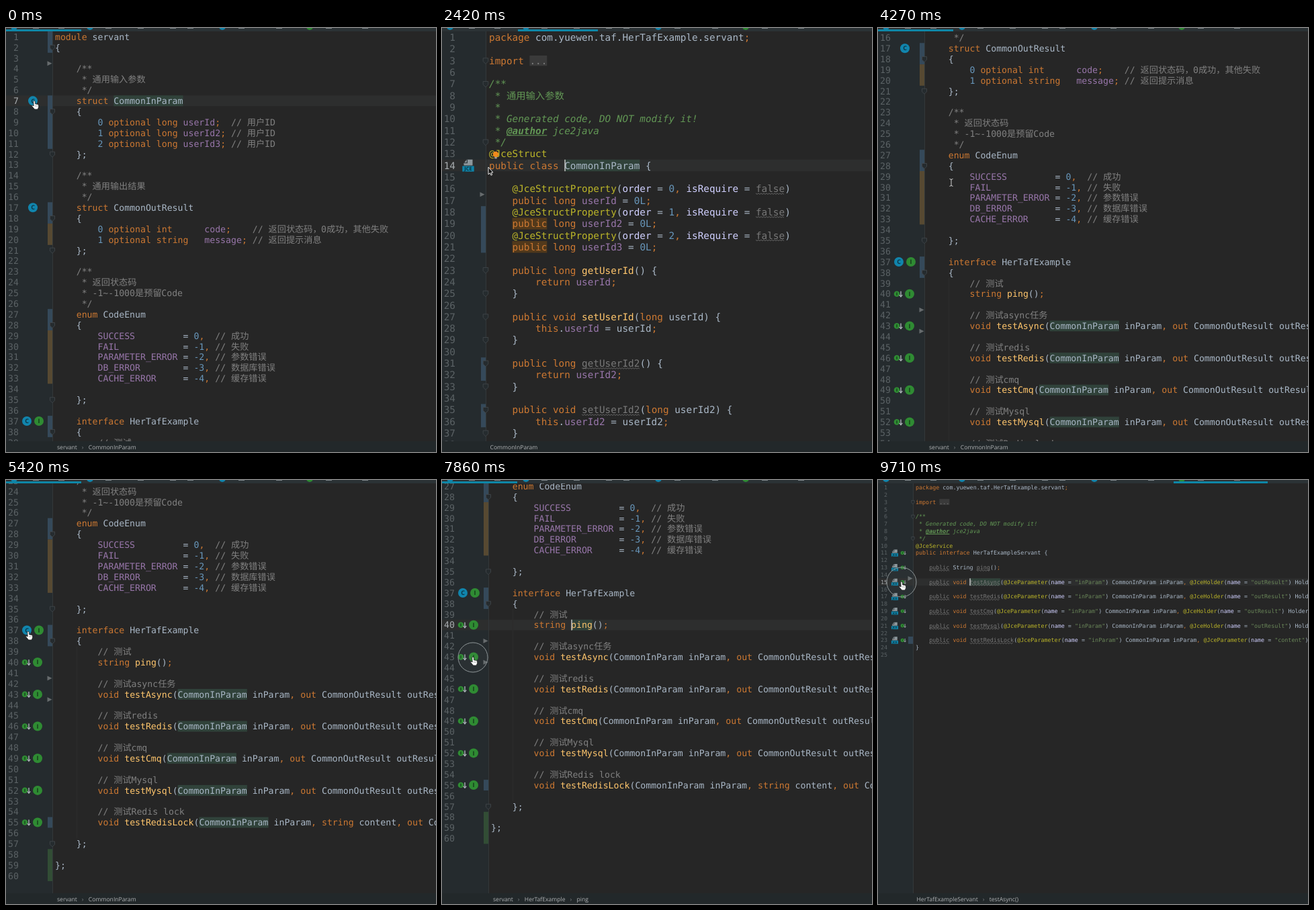
These frames come from a looping animation (640 by 631 pixels, 9860 ms). An HTML page with a canvas:

```html
<!DOCTYPE html>
<html lang="zh">
<head>
<meta charset="utf-8">
<title>Code navigation</title>
<style>
html, body { margin: 0; width: 100%; height: 100%; overflow: hidden; background: #262626; }
canvas { display: block; }
</style>
</head>
<body>
<canvas id="stage" width="640" height="631"></canvas>
<script>
const LOOP = 9860, W = 640, H = 631, BAR = 615;
const ctx = document.getElementById('stage').getContext('2d');
const MONO = '"DejaVu Sans Mono", "Noto Sans CJK SC", "Noto Sans CJK", monospace';
const SANS = '"Open Sans", "Noto Sans", sans-serif';
const C = {
  bg: '#262626', gutter: '#252b2e', row: '#2d2e2e', text: '#a9b7c6', key: '#cc7832',
  num: '#6897bb', field: '#9876aa', fn: '#ffc66d', ann: '#bbb529', str: '#6a8759',
  doc: '#629755', note: '#808080', dim: '#787878', attr: '#d0d0ff', mark: '#30423a',
  warn: '#52391b', line: '#5b6265', lineOn: '#a9adb0', blue: '#35495a',
  brown: '#574932', green: '#324d35', teal: '#1185ad', leaf: '#2f8b33'
};
const KEYS = new Set(('module struct optional long int string enum interface void out package import ' +
  'public class return this private implements new').split(' '));
const TOKEN = /([~!%$&])(\w+)\1|\/\/.*|".*?"|@\w+|\.\.\.|[A-Za-z_]\w*|-?\d+L?|[;,]|\s+|[^\w\s]/g;
const STYLE = { '~': C.dim, '!': C.key, '%': C.field, '$': C.fn, '&': C.attr };

// Markup: ~unused~  !warned keyword!  %field%  $method$  &attribute&
const call = (name, note) => `        // 测试${note}
        void $${name}$(CommonInParam inParam, out CommonOutResult outResult);
`;
const jceText = `module servant
{

    /**
     * 通用输入参数
     */
    struct CommonInParam
    {
        0 optional long %userId%;  // 用户ID
        1 optional long %userId2%; // 用户ID
        2 optional long %userId3%; // 用户ID
    };

    /**
     * 通用输出结果
     */
    struct CommonOutResult
    {
        0 optional int      %code%;    // 返回状态码，0成功，其他失败
        1 optional string   %message%; // 返回提示消息
    };

    /**
     * 返回状态码
     * -1~-1000是预留Code
     */
    enum CodeEnum
    {
        %SUCCESS%         = 0,  // 成功
        %FAIL%            = -1, // 失败
        %PARAMETER_ERROR% = -2, // 参数错误
        %DB_ERROR%        = -3, // 数据库错误
        %CACHE_ERROR%     = -4, // 缓存错误

    };

    interface HerTafExample
    {
        // 测试
        string $ping$();

${call('testAsync', 'async任务')}
${call('testRedis', 'redis')}
${call('testCmq', 'cmq')}
${call('testMysql', 'Mysql')}
        // 测试Redis lock
        void $testRedisLock$(CommonInParam inParam, string content, out CommonOutResult outResult);

    };

};
`;

const prop = (i, pub) => `    @JceStructProperty(&order& = ${i}, &isRequire& = ~false~)
    ${pub} long %userId${i ? i + 1 : ''}% = 0L;
`;
const access = (id, q) => `
    public long ${q}getU${id}${q}() {
        return %u${id}%;
    }

    public void ${q}setU${id}${q}(long u${id}) {
        this.%u${id}% = u${id};
    }
`;
const structText = `package com.yuewen.taf.HerTafExample.servant;

import ...



/**
 * 通用输入参数
 *
 * Generated code, DO NOT modify it!
 * @author jce2java
 */
@JceStruct
public class CommonInParam {

` + prop(0, 'public') + prop(1, '!public!') + prop(2, '!public!') +
  access('serId', '$') + access('serId2', '~');

const over = (name, body) => `
    @Override
    public void $${name}$(CommonInParam inParam, Holder<CommonOutResult> outResult) {
${body}
    }
`;
const implText = '\n'.repeat(12) + `@TafService("obj")
public class ~HerTafExampleImpl~ implements HerTafExampleServant {
    @Autowired
    private ICosService ~iCosService~;

    @Autowired
    private ExampleAsync ~exampleAsync~;

    public ~HerTafExampleImpl~() {
    }

    public String $ping$() {
        return "success";
    }
` + over('testAsync', `        %exampleAsync%.task();

        CommonOutResult outResultValue = new CommonOutResult(Code.%SUCCESS%.getValue());
        outResult.setValue(outResultValue);`) +
  over('testRedis', '') + over('testCmq', '') + over('testMysql', '');

const param = n => `@JceParameter(&name& = "${n}")`;
const remote = (name, mid = '') => `
    ~public~ void ~${name}~(${param('inParam')} CommonInParam inParam, ${mid}@JceHolder(&name& = "outResult") Holder<CommonOutResult> outResult);
`;
const servantText = `package com.yuewen.taf.HerTafExample.servant;

import ...


/**
 * Generated code, DO NOT modify it!
 * @author jce2java
 */
@JceService
public interface HerTafExampleServant {

    ~public~ String ~ping~();
` + ['testAsync', 'testRedis', 'testCmq', 'testMysql'].map(n => remote(n)).join('') +
  remote('testRedisLock', param('content') + ' String content, ') + '}\n';

const each = (lines, ...icons) => lines.flatMap(n => icons.map(([kind, x]) => [n, kind, x]));
const jce = {
  text: jceText, x: 73, y: 13, pitch: 15.89, cw: 7.94, gut: 69, right: 19, tab: [0, 112],
  icons: [[7, 'c', 40], [17, 'c', 40], [37, 'c', 31], [37, 'i', 49],
    ...each([40, 43, 46, 49, 52, 55], ['down', 29], ['i', 47])],
  vcs: [[1, 2, C.blue], [7, 11, C.blue], [17, 18, C.blue], [19, 20, C.brown], [27, 28, C.blue],
    [29, 33, C.brown], [37, 38, C.blue], [55, 55, C.blue], [58, 60, C.green]],
  folds: [2, 8, 12, 18, 21, 28, 35, 38, 57], tris: [3.5, 41.5, 43.5], triX: 65
};
const top7 = { ...jce, cur: 7, mark: 'CommonInParam', crumbs: ['servant', 'CommonInParam'] };
const onPing = { ...jce, cur: 40, mark: 'ping', caret: 193, crumbs: ['servant', 'HerTafExample', 'ping'] };
const struct = {
  text: structText, java: true, x: 70, y: 14, pitch: 17.32, cw: 8.63, gut: 65, right: 20, skip: 2,
  tab: [113, 232], cur: 14, mark: 'CommonInParam', caret: 183, bulb: [80, 188, '#f08a1c'],
  icons: [[14, 'jce', 39]], vcs: [[18, 21, C.blue], [31, 32, C.blue], [35, 36, C.blue]],
  folds: [3, 7, 12, 23, 25, 27, 29, 31, 33, 35, 37], tris: [16.5], triX: 60, crumbs: ['CommonInParam']
};
const impl = {
  text: implText, java: true, x: 89, y: -165.8, pitch: 16.6, cw: 7.94, gut: 83, right: 19,
  tab: [312, 438], cur: 24, mark: 'ping', caret: 232, bulb: [99, 213, '#f0b32c'],
  icons: [[14, 'jce', 48], [21, 'at', 65], [29, 'jce', 48], [29, 'at', 65],
    ...each([24, 29, 37, 42, 47], ['up', 30]), ...each([24, 37, 42, 47], ['jce', 56])],
  vcs: [[25, 25, C.blue]], folds: [21, 22, 24, 26, 29, 34, 37, 39, 42, 44, 47],
  tris: [12.5, 14.5, 21.5, 27.5, 29.5, 33.5, 35.5], triX: 79, crumbs: ['HerTafExampleImpl', 'ping()']
};
const servant = {
  text: servantText, java: true, x: 56, y: 11, pitch: 10.83, cw: 5.04, gut: 52, right: 14, skip: 1,
  tab: [440, 580], cur: 15, mark: 'testAsync', caret: 137,
  icons: each([11, 13, 15, 17, 19, 21, 23], ['jce', 25], ['down', 37]), vcs: [[23, 23, C.blue]],
  folds: [3, 6, 9], tris: [14.5], triX: 48, crumbs: ['HerTafExampleServant', 'testAsync()']
};
const CUTS = [[0, top7], [850, struct], [3000, top7], [5700, impl], [6950, onPing], [8090, servant]];
const SCROLL = [[3450, 0], [4270, 237], [4900, 361.5], [5700, 361.5], [6900, 417]];
const POINTER = [
  [0, 42, 109, 'hand'], [850, 42, 109, 'arrow'], [1500, 60, 170, 'arrow'], [2100, 74, 214, 'arrow'],
  [2420, 69, 207, 'arrow'], [2720, 39, 205, 'hand'], [3000, 39, 205, 'arrow'], [3300, 109, 230, 'beam'],
  [4600, 109, 230, 'arrow'], [5150, 33, 226, 'hand'], [5750, 33, 226, 'arrow'], [6400, 57, 220, 'hand'],
  [7050, 57, 220, 'arrow'], [7600, 46, 264, 'hand'], [8150, 46, 264, 'arrow'], [9100, 35, 152, 'hand']
];
const CLICKS = [620, 2790, 5570, 6800, 7780, 9620];

const last = (keys, t) => keys.filter(k => k[0] <= t).pop() || keys[0];
const ease = p => p * p * (3 - 2 * p);
function track(keys, t, i) {
  const a = last(keys, t), b = keys[keys.indexOf(a) + 1];
  if (!b || t <= a[0]) return a[i];
  return a[i] + (b[i] - a[i]) * ease((t - a[0]) / (b[0] - a[0]));
}
function box(x, y, w, h, color) { ctx.fillStyle = color; ctx.fillRect(x, y, w, h); }
function disc(x, y, r, color) {
  ctx.fillStyle = color;
  ctx.beginPath(); ctx.arc(x, y, r, 0, 7); ctx.fill();
}
function path(points, fill, stroke, width = 1) {
  ctx.beginPath();
  points.forEach(([x, y], i) => i ? ctx.lineTo(x, y) : ctx.moveTo(x, y));
  if (fill) { ctx.closePath(); ctx.fillStyle = fill; ctx.fill(); }
  if (stroke) { ctx.strokeStyle = stroke; ctx.lineWidth = width; ctx.stroke(); }
}
function label(str, x, y, font, color, align = 'left') {
  ctx.font = font; ctx.fillStyle = color; ctx.textAlign = align;
  ctx.fillText(str, x, y);
}

// Draws one run on the character grid and returns the x after it.
function put(s, str, x, y, color, look = '') {
  const em = s.cw / 0.602;
  for (const run of str.match(/[\u2e80-\uffef]+|[^\u2e80-\uffef]+/g) || []) {
    const wide = run.charCodeAt(0) >= 0x2e80;
    label(run, x, y + em * 0.36, `${wide ? '' : look} ${em}px ${MONO}`, color);
    x += run.length * (wide ? em * 0.99 : s.cw);
  }
  return x;
}
function wave(x, end, y) {
  const pts = [];
  for (let i = 0; x + i * 2 <= end; i++) pts.push([x + i * 2, y + (i % 2 ? 1 : -0.5)]);
  path(pts, null, '#747474', 0.8);
}
function docLine(s, str, y) {
  let x = s.x;
  for (const part of str.split(/(@\w+)/)) {
    const tag = part[0] === '@', from = x;
    x = put(s, part, x, y, s.java ? C.doc : C.note, s.java ? (tag ? 'italic bold' : 'italic') : '');
    if (tag) box(from, y + s.cw * 0.78, x - from, 1, C.doc);
  }
}
function codeLine(s, str, y) {
  if (/^\s*(\/\*|\*)/.test(str)) return docLine(s, str, y);
  const closing = /^\s*};$/.test(str), h = s.pitch;
  let x = s.x;
  for (const m of str.matchAll(TOKEN)) {
    const kind = m[1], word = m[2] || m[0], end = x + word.length * s.cw;
    let color = C.text;
    if (kind) color = STYLE[kind];
    else if (word.startsWith('//')) color = C.note;
    else if (word[0] === '"') color = C.str;
    else if (word[0] === '@') color = C.ann;
    else if (KEYS.has(word) || (/[;,]/.test(word) && !closing)) color = C.key;
    else if (/^-?\d/.test(word)) color = C.num;
    if (word === s.mark) box(x, y - h / 2, end - x, h, C.mark);
    if (kind === '!') box(x, y - h / 2, end - x, h, C.warn);
    if (word === '...') { box(x, y - h / 2 + 1, end - x, h - 2, '#3a3a3a'); color = C.note; }
    const italic = s.java && word === 'SUCCESS' ? 'italic' : '';
    x = put(s, word, x, y, color, italic);
    if (kind === '~') wave(end - word.length * s.cw, end, y + s.cw * 0.85);
  }
}

const letter = (ch, px, color, y = 0) => label(ch, 0, y + px * 0.36, `bold ${px}px ${SANS}`, color, 'center');
function arrow(x, dir, color) {
  path([[x, -4 * dir], [x, 4 * dir]], null, color, 1.3);
  path([[x - 2.3, 1.5 * dir], [x, 4.3 * dir], [x + 2.3, 1.5 * dir]], null, color, 1.2);
}
const ICON = {
  c() { disc(0, 0, 7, C.teal); letter('C', 9, '#0d3444'); },
  i() { disc(0, 0, 7, C.leaf); letter('I', 9, '#14381a'); },
  down() { disc(-1, 0, 4.3, C.leaf); box(-1.6, -2.2, 1.2, 4.4, '#14381a'); arrow(5, 1, '#b4bcc0'); },
  up() { disc(-1, 0, 4.3, C.leaf); box(-1.6, -2.2, 1.2, 4.4, '#14381a'); arrow(5, -1, '#d4504a'); },
  at() { letter('@', 12, '#aab0b3'); },
  jce() {
    path([[-6, -3], [-2, -8], [6, -8], [6, 0], [-6, 0]], '#8d979c');
    path([[-6, -3.5], [-1.5, -3.5], [-1.5, -8]], null, C.gutter, 1);
    box(-8, 0.8, 16, 7.6, '#0f83a8');
    letter('JCE', 7, '#0c3442', 4.7);
  }
};

function editor(s, shift) {
  const k = s.cw / 7.94, h = s.pitch;
  const rowY = n => s.y - shift + (n - 1 - (s.skip && n > 3 ? s.skip : 0)) * h;
  box(0, 0, s.gut, H, C.gutter);
  box(0, rowY(s.cur) - h / 2, W, h, C.row);
  for (const [a, b, color] of s.vcs) box(s.gut - 7, rowY(a) - h / 2, 7, rowY(b) - rowY(a) + h, color);
  box(s.gut, 5, 1, BAR - 5, '#33383a');
  if (!s.java) box(s.x + 4 * s.cw, rowY(39) - h / 2, 1, 18 * h, '#2d2d2d');
  for (const n of s.folds) {
    const y = rowY(n), r = 3.5 * k;
    path([[s.gut - r, y - r], [s.gut + r, y - r], [s.gut + r, y + 1], [s.gut, y + r + 1], [s.gut - r, y + 1], [s.gut - r, y - r]],
      C.gutter, '#444a4d', 0.8);
  }
  s.text.split('\n').forEach((str, i) => {
    const n = i + 1, y = rowY(n);
    if (y < -h || y > BAR + h || (s.skip && n > 3 && n <= 3 + s.skip)) return;
    put(s, String(n), s.right - String(n).length * s.cw, y, n === s.cur ? C.lineOn : C.line);
    codeLine(s, str, y);
  });
  for (const n of s.tris) {
    const y = rowY(n);
    path([[s.triX - 3.5, y - 3.5], [s.triX + 3.5, y], [s.triX - 3.5, y + 3.5]], '#666b6d');
  }
  for (const [n, kind, x] of s.icons) {
    ctx.save();
    ctx.translate(x, rowY(n)); ctx.scale(k, k);
    ICON[kind]();
    ctx.restore();
  }
  if (s.caret) box(s.caret - 0.7, rowY(s.cur) - h / 2, 1.5, h, '#c4c4c4');
  if (s.bulb) {
    const [x, y, color] = s.bulb;
    disc(x, y, 4.2, color);
    box(x - 1.8, y + 4, 3.6, 2.5, '#9a9a9a');
  }
}

function chrome(s) {
  box(0, 0, W, 5, '#2b3235');
  for (const x of [12, 125, 322]) disc(x, -2, 5, C.teal);
  disc(452, -2, 5, C.leaf);
  for (const x of [40, 78, 148, 196, 244, 270, 346, 402, 476, 530]) box(x, 0, 9, 1, '#7d8589');
  box(s.tab[0], 2, s.tab[1] - s.tab[0], 3, '#0e86a6');
  box(0, BAR, W, H - BAR, '#22282a');
  let x = s.x + (s.java ? 1.5 : 3);
  s.crumbs.forEach((name, i) => {
    if (i) label('›', x - 10, 627, `9px ${SANS}`, '#7a7f82');
    label(name, x, 627, `8.6px ${SANS}`, '#b0b3b5');
    x += ctx.measureText(name).width + 17;
  });
}

const HAND = [[-1.2, 0], [0, -1], [1.2, 0], [1.6, 4], [4.5, 4.4], [6.5, 5.5], [6.6, 8.5], [5.2, 12], [0.6, 12], [-3.6, 7], [-2.8, 6], [-0.8, 7]];
const ARROW = [[0, 0], [0, 11], [2.5, 8.8], [4, 12.2], [5.6, 11.5], [4.2, 8.2], [7, 8]];
function pointer(t) {
  const x = track(POINTER, t, 1), y = track(POINTER, t, 2), kind = last(POINTER, t)[3];
  const click = CLICKS.find(c => t >= c && t < c + 260);
  if (click !== undefined) {
    ctx.beginPath();
    ctx.arc(x, y, Math.min(22, 10 + (t - click) * 0.16), 0, 7);
    ctx.fillStyle = 'rgba(120,130,135,0.06)'; ctx.fill();
    ctx.strokeStyle = '#8f9698'; ctx.lineWidth = 1; ctx.stroke();
  }
  ctx.save();
  ctx.translate(x, y);
  if (kind === 'beam') {
    path([[-2.5, -5.5], [0, -4.5], [2.5, -5.5]], null, '#d0d0d0');
    path([[0, -5], [0, 5]], null, '#d0d0d0');
    path([[-2.5, 5.5], [0, 4.5], [2.5, 5.5]], null, '#d0d0d0');
  } else if (kind === 'hand') {
    path([...HAND, HAND[0]], '#fff', '#222', 0.8);
    path([[2, 6], [2, 8]], null, '#555', 0.6);
    path([[4.2, 6.2], [4.2, 8]], null, '#555', 0.6);
  } else {
    path([...ARROW, ARROW[0]], '#111', '#eee', 1);
  }
  ctx.restore();
}

function draw(t) {
  const s = last(CUTS, t)[1];
  ctx.textRendering = 'geometricPrecision';
  box(0, 0, W, H, C.bg);
  editor(s, s.java ? 0 : track(SCROLL, t, 1));
  chrome(s);
  pointer(t);
}
const start = performance.now();
function tick() {
  draw((performance.now() - start) % LOOP);
  requestAnimationFrame(tick);
}
tick();
</script>
</body>
</html>
```
